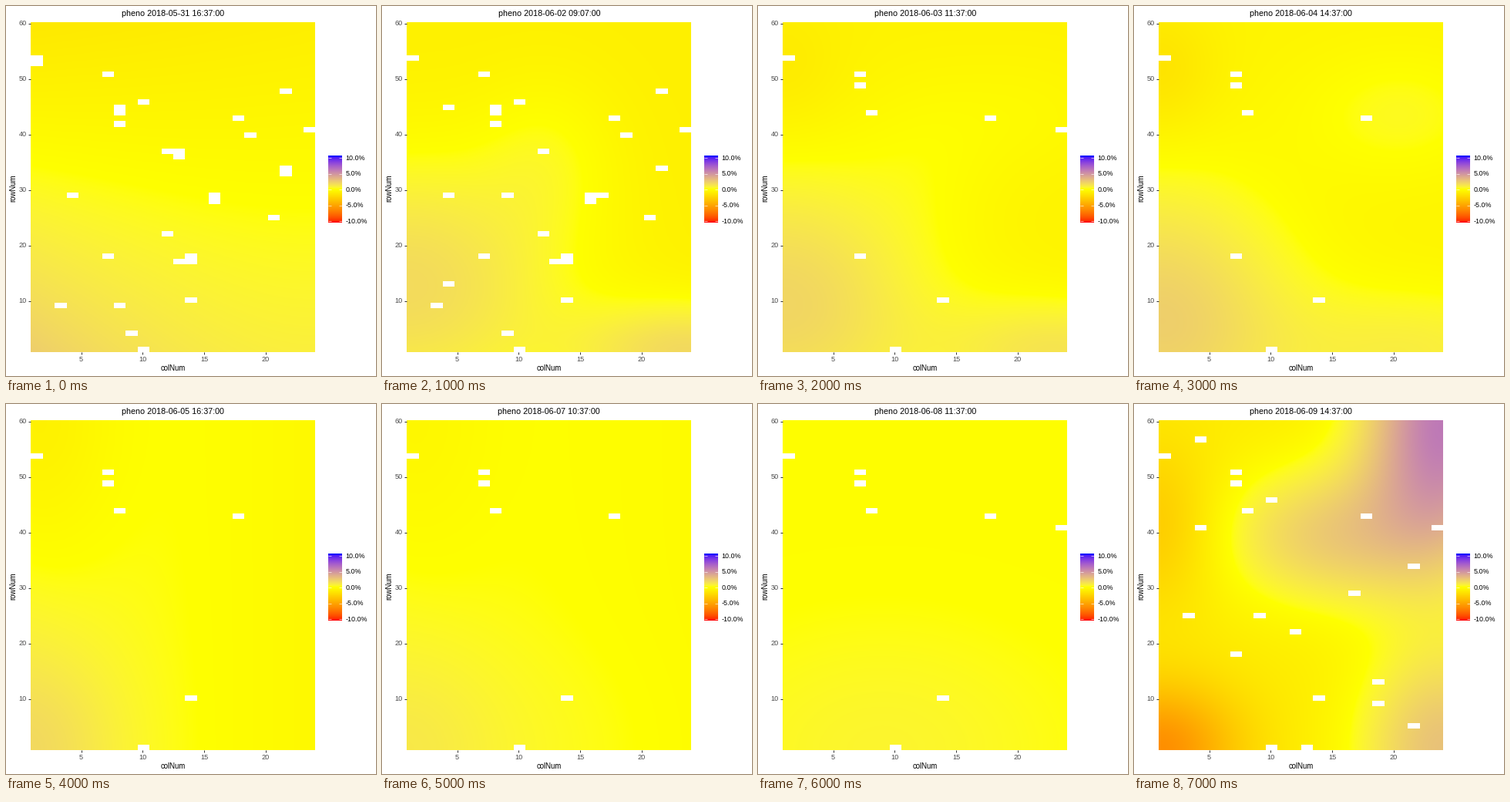
A matplotlib script that plays this animation: 480 by 480 pixels, repeating every 8 s.

```python
import numpy as np
import matplotlib
import matplotlib.pyplot as plt
from matplotlib.animation import FuncAnimation

SIZE = 480
LEFT, TOP, RIGHT, BOTTOM = 32, 21, 401, 449
LIMIT = 10.5  # percent at the ends of the colour scale

matplotlib.rcParams["font.family"] = "Liberation Sans"

# Lab anchors of the scale: red, yellow, blue
LAB = np.array([[53.24, 80.09, 67.20], [97.14, -21.55, 94.48], [32.30, 79.19, -107.86]])
XYZ_TO_RGB = np.array([[3.2406, -1.5372, -0.4986],
                       [-0.9689, 1.8758, 0.0415],
                       [0.0557, -0.2040, 1.0570]])

# Panel coordinates: u runs right, v runs up, both from 0 to 1
u = np.linspace(0, 1, RIGHT - LEFT)[None, :]
v = np.linspace(1, 0, BOTTOM - TOP)[:, None]


def colour(percent):
    """Map percent values to sRGB, blending the anchors in Lab space."""
    pos = np.clip(np.asarray(percent) / LIMIT, -1, 1)
    l, a, b = (np.interp(pos, [-1, 0, 1], LAB[:, i]) for i in range(3))
    fy = (l + 16) / 116
    f = np.stack([fy + a / 500, fy, fy - b / 200], axis=-1)
    xyz = np.where(f > 6 / 29, f ** 3, (f - 4 / 29) * 3 * (6 / 29) ** 2)
    rgb = np.clip((xyz * [0.9505, 1, 1.089]) @ XYZ_TO_RGB.T, 0, 1)
    return np.clip(np.where(rgb > 0.0031308, 1.055 * rgb ** (1 / 2.4) - 0.055, 12.92 * rgb), 0, 1)


def hill(height, x, y, rx, ry):
    return height * np.exp(-((u - x) / rx) ** 2 - ((v - y) / ry) ** 2)


# Deviation fields in percent
may31 = 0.7 - 1.6 * v + 1.5 * ((1 - u) * (1 - v)) ** 2 - 0.4 * (1 - u) * v ** 3
jun02 = (hill(2.45, 0, 0.2, 0.55, 0.39) + hill(0.7, 0.5, 0.6, 0.25, 0.25)
         + hill(2.45, 1, 0, 0.4, 0.15) - 0.85)
jun04 = (hill(2.7, 0, 0.1, 0.45, 0.4) + hill(1.3, 0.9, 0, 0.5, 0.2)
         + hill(0.8, 0.85, 0.72, 0.35, 0.2) - hill(1, 0, 0.85, 0.2, 0.2) - 0.6)
jun05 = 0.45 - 0.8 * u + hill(1.25, 0, 0, 0.3, 0.3) - hill(1.2, 0, 1, 0.3, 0.45)
jun08 = hill(0.5, 0.35, 0, 0.6, 0.35) - 0.08
jun09 = (hill(7, 1, 1, 0.27, 0.4) + hill(3.2, 0.6, 0.65, 0.4, 0.22)
         + hill(3.8, 1, 0, 0.3, 0.32) - hill(2, 0, 0.68, 0.2, 0.25)
         - hill(5.1, 0, 0, 0.28, 0.2) - 1.1)

# Missing plots as (column, row)
always = [(1, 54), (7, 51), (8, 44), (18, 43), (14, 10), (10, 1)]
flaky = [(10, 46), (24, 41), (22, 34), (12, 22), (7, 18)]
later = always + [(7, 49)]
early = always + flaky + [(8, 45), (8, 42), (12, 37), (22, 48), (19, 40), (16, 29), (16, 28),
                          (4, 29), (21, 25), (13, 17), (14, 17), (14, 18), (3, 9), (9, 4)]
first = early + [(1, 53), (13, 37), (13, 36), (22, 33), (8, 9)]
second = early + [(4, 45), (17, 29), (9, 29), (4, 13)]
last = later + flaky + [(4, 57), (4, 41), (17, 29), (3, 25), (9, 25),
                        (19, 13), (19, 9), (22, 5), (13, 1)]

SCENES = [
    ("05-31 16:37", may31, first),
    ("06-02 09:07", jun02, second),
    ("06-03 11:37", (jun02 + jun04) / 2, later + [(7, 18), (24, 41)]),
    ("06-04 14:37", jun04, later + [(7, 18)]),
    ("06-05 16:37", jun05, later),
    ("06-07 10:37", (jun05 + jun08) / 2, later),
    ("06-08 11:37", jun08, later + [(24, 41)]),
    ("06-09 14:37", jun09, last),
]


def col_edge(k):
    return round(0.48 + 15.37 * k)


def row_edge(k):
    return round(428.32 - 7.1395 * k)


def paint(field, gaps):
    rgb = colour(field)
    for col, row in gaps:
        rgb[row_edge(row):row_edge(row - 1), col_edge(col - 1):col_edge(col)] = 1
    return rgb


fig = plt.figure(figsize=(SIZE / 72, SIZE / 72), dpi=72, facecolor="white")
ax = fig.add_axes([0, 0, 1, 1])
ax.axis("off")


def line(xs, ys, shade, width=1):
    ax.plot(xs, ys, color=shade, lw=width, solid_capstyle="butt")


def label(x, y, text, size, shade="black", align="center", **extra):
    return ax.text(x, y, text, fontsize=size, color=shade, ha=align, va="baseline", **extra)


panel = ax.imshow(paint(*SCENES[0][1:]), extent=(LEFT, RIGHT, BOTTOM, TOP), interpolation="nearest")
bar = colour(np.linspace(LIMIT, -LIMIT, 86))[:, None]
ax.imshow(bar, extent=(418.3, 435.6, 281.2, 194.8), interpolation="nearest")

for value in range(5, 25, 5):
    x = 97.5 + (value - 5) * 15.95
    line([x, x], [449, 452], "#333333")
    label(x, 461, str(value), 9.1, "#4d4d4d")
for value in range(10, 70, 10):
    y = 382.5 - (value - 10) * 7.2
    line([29, 32], [y, y], "#333333")
    label(27, y + 2.6, str(value), 9.1, "#4d4d4d", "right")
for value in (10, 5, 0, -5, -10):
    y = 238 - value * 4.1
    line([418.3, 421.7], [y, y], "white", 0.6)
    line([432.2, 435.6], [y, y], "white", 0.6)
    label(440.7, y + 2.6, f"{value:.1f}%", 8.9, align="left")

label(216.5, 473, "colNum", 9.6)
label(12.5, 236, "rowNum", 9.6, rotation=90, rotation_mode="anchor")
title = label(216.8, 13, "", 10.7)

ax.set_xlim(0, SIZE)
ax.set_ylim(SIZE, 0)
ax.set_aspect("auto")


def update(i):
    stamp, field, gaps = SCENES[i]
    panel.set_data(paint(field, gaps))
    title.set_text(f"pheno 2018-{stamp}:00")
    return panel, title


anim = FuncAnimation(fig, update, frames=len(SCENES), interval=1000, repeat=True, repeat_delay=0)
plt.show()
```
